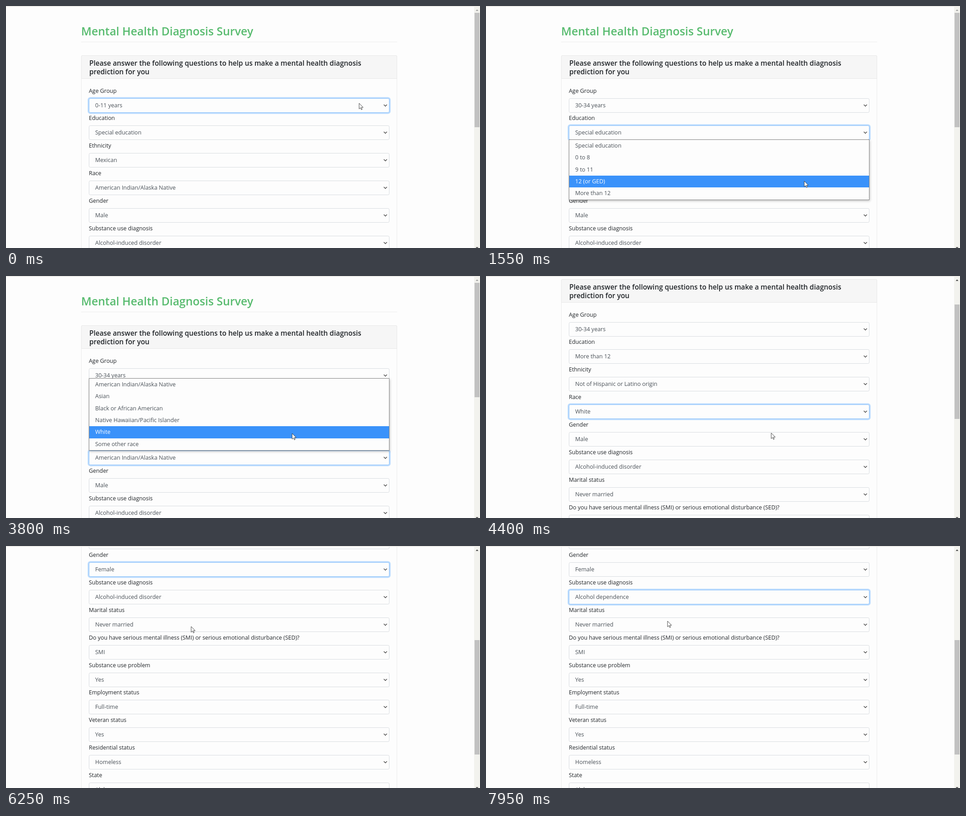
Recreate the animation shown at these times as an HTML page. Size 1047 by 535 pixels, loop 8000 ms.

```html
<!DOCTYPE html>
<html lang="en">
<head>
<meta charset="utf-8">
<title>Mental Health Diagnosis Survey</title>
<style>
  html, body { margin: 0; width: 100%; height: 100%; overflow: hidden; }
  body { position: relative; background: #fdfdfd; color: #212529; font: 12.4px/20px "Open Sans", "Noto Sans", sans-serif; }
  #stage { position: absolute; left: 0; top: 0; width: 1047px; height: 535px; overflow: hidden; background: #fdfdfd; }
  #stage div, #stage svg, h1, h2 { position: absolute; box-sizing: border-box; margin: 0; white-space: nowrap; }
  #page { left: 0; top: 0; width: 1034px; height: 1140px; }
  h1 { left: 166px; top: 38px; font-size: 24.9px; line-height: 35px; font-weight: 600; color: #58bb6f; }
  .rule { left: 166px; top: 79px; width: 698px; height: 1px; background: #ececec; }
  .card { left: 166px; top: 109px; width: 698px; height: 1020px; border: 1px solid #ebebeb; border-radius: 3px; }
  h2 { left: 166px; top: 109px; width: 698px; height: 52px; padding: 6.5px 16px 0 17px; font-size: 15.4px; line-height: 19.8px; font-weight: 600;
       background: #f6f6f6; border: 1px solid #e8e8e8; border-radius: 3px 3px 0 0; }
  .label { left: 183px; }
  .select { left: 183px; width: 664px; height: 32px; padding-left: 13px; line-height: 30.5px; font-size: 12.5px; color: #495057;
            background: #fdfdfd; border: 1px solid #d8dce0; border-radius: 3.3px; }
  .select.focus { border-color: #8cc1f9; box-shadow: 0 0 0 2.6px rgba(0, 123, 255, .26); }
  .select svg { right: 3px; top: 12px; }
  .popup { left: 183px; width: 664px; background: #fdfdfd; border: 1px solid #868686; box-shadow: 1px 2px 5px rgba(0, 0, 0, .25); z-index: 2; }
  .option { left: 0; width: 100%; height: 26.3px; padding-left: 13px; line-height: 26.3px; font-size: 12.5px; color: #495057; }
  .option.hot { background: #3a92fa; color: #fff; }
  .edge { left: 0; top: 0; width: 1047px; height: 2px; background: linear-gradient(#e4e3df 50%, #f3f2ef 50%); }
  .track { left: 1034px; top: 2px; width: 13px; height: 533px; background: #f2f2ee; }
  #thumb { left: 1035px; top: 15px; width: 11px; height: 253px; background: #c1c1c1; }
</style>
</head>
<body>
<div id="stage">
  <div id="page">
    <h1>Mental Health Diagnosis Survey</h1>
    <div class="rule"></div>
    <div class="card"></div>
    <h2>Please answer the following questions to help us make a mental health diagnosis<br>prediction for you</h2>
  </div>
  <div class="edge"></div>
  <div class="track"></div>
  <div id="thumb"></div>
  <svg width="13" height="535" style="left:1034px;top:0">
    <path id="up" d="M3.5 11h6l-3-3.5z"/>
    <path d="M3.5 533h6l-3 3.5z" fill="#505050"/>
  </svg>
  <svg id="cursor" width="14" height="20" style="left:-1px;top:-1px;z-index:3">
    <path d="M1 1v12.6l2.9-2.7 2 4.4 1.9-.9-2-4.2h4.1z" fill="#fff" stroke="#333" stroke-width=".9"/>
  </svg>
</div>
<script>
const LOOP = 8000, PITCH = 60.87, ROW = 26.3;
const $ = id => document.getElementById(id);
const page = $('page');

// options: first is the initial value; pick is chosen when the list closes
const fields = [
  { label: 'Age Group', pick: 6, open: 150, close: 900,
    options: ['0-11', '12-14', '15-17', '18-20', '21-24', '25-29', '30-34', '35-39', '40-44', '45-49', '50-54', '55-59', '60-64', '65+'].map(a => a + ' years') },
  { label: 'Education', pick: 4, open: 1250, close: 1750,
    options: ['Special education', '0 to 8', '9 to 11', '12 (or GED)', 'More than 12'] },
  { label: 'Ethnicity', pick: 3, open: 2200, close: 2850,
    options: ['Mexican', 'Puerto Rican', 'Other Hispanic or Latino origin', 'Not of Hispanic or Latino origin'] },
  { label: 'Race', pick: 4, open: 3300, close: 3950, upward: true,
    options: ['American Indian/Alaska Native', 'Asian', 'Black or African American', 'Native Hawaiian/Pacific Islander', 'White', 'Some other race'] },
  { label: 'Gender', pick: 1, open: 5500, close: 5950, options: ['Male', 'Female'] },
  { label: 'Substance use diagnosis', pick: 3, open: 6850, close: 7750,
    options: ['Alcohol-induced disorder', 'Substance-induced disorder', 'Alcohol intoxication', 'Alcohol dependence', 'Cocaine dependence',
      'Cannabis dependence', 'Opioid dependence', 'Other substance dependence', 'Alcohol abuse', 'Cocaine abuse', 'Cannabis abuse',
      'Opioid abuse', 'Other substance related conditions'] },
  { label: 'Marital status', options: ['Never married'] },
  { label: 'Do you have serious mental illness (SMI) or serious emotional disturbance (SED)?', options: ['SMI'] },
  { label: 'Substance use problem', options: ['Yes'] },
  { label: 'Employment status', options: ['Full-time'] },
  { label: 'Veteran status', options: ['Yes'] },
  { label: 'Residential status', options: ['Homeless'] },
  { label: 'State', options: ['Alabama'] }
];

// [time, scroll offset]: five wheel notches
const scrollKeys = [[0, 0], [4200, 0], [4350, 82], [4400, 102], [4480, 164], [4600, 164], [4730, 247],
  [4830, 247], [4960, 329], [6030, 329], [6180, 411]];

// [time, x, y] of the pointer tip
const pointerKeys = [[0, 780, 215], [150, 780, 215], [750, 745, 402], [900, 743, 404], [1150, 725, 283], [1250, 722, 280],
  [1550, 703, 387], [1680, 700, 412], [1760, 700, 412], [2100, 700, 345], [2200, 700, 343], [2700, 689, 448],
  [2950, 687, 450], [3200, 672, 405], [3300, 670, 402], [3750, 632, 348], [4400, 630, 347], [4750, 622, 338],
  [5250, 430, 113], [5450, 425, 134], [5500, 425, 134], [5850, 410, 186], [5950, 410, 186], [6250, 409, 178],
  [6700, 404, 115], [6850, 404, 112], [7450, 402, 218], [7750, 402, 219], [7950, 401, 166]];

function sample(keys, t) {
  const i = keys.findIndex(k => k[0] > t);
  if (i < 0) return keys[keys.length - 1].slice(1);
  const a = keys[i - 1], b = keys[i], u = (t - a[0]) / (b[0] - a[0]), e = u * u * (3 - 2 * u);
  return a.slice(1).map((v, n) => v + (b[n + 1] - v) * e);
}

function add(parent, className, top, text = '') {
  const el = document.createElement('div');
  el.className = className;
  el.style.top = top + 'px';
  el.textContent = text;
  parent.append(el);
  return el;
}

fields.forEach((f, i) => {
  const y = Math.round(203.6 + PITCH * i);
  add(page, 'label', y - 26.3, f.label);
  f.select = add(page, 'select', y);
  f.select.innerHTML = '<span></span><svg width="10" height="7"><path d="M1.5 1l3.5 3.5L8.5 1" fill="none" stroke="#444" stroke-width="1.3"/></svg>';
  f.value = f.select.firstChild;
  f.value.textContent = f.options[0];
  if (!f.open) return;
  const height = f.options.length * ROW + 2;
  f.top = f.upward ? y - height : y + 31;
  f.popup = add(page, 'popup', f.top);
  f.popup.style.height = height + 'px';
  f.rows = f.options.map((text, n) => add(f.popup, 'option', n * ROW, text));
});

const active = fields.filter(f => f.open);

function draw(t) {
  const scroll = Math.round(sample(scrollKeys, t)[0]);
  const [x, y] = sample(pointerKeys, t);
  page.style.transform = `translateY(${-scroll}px)`;
  $('thumb').style.transform = `translateY(${Math.round(scroll * .469)}px)`;
  $('up').setAttribute('fill', scroll ? '#505050' : '#a3a3a3');
  $('cursor').style.transform = `translate(${Math.round(x)}px, ${Math.round(y)}px)`;

  const focused = active.filter(f => f.open <= t).pop() || active[0];
  for (const f of active) {
    const shown = t >= f.open && t < f.close;
    f.select.classList.toggle('focus', f === focused);
    f.value.textContent = f.options[t >= f.close ? f.pick : 0];
    f.popup.style.display = shown ? 'block' : 'none';
    if (!shown) continue;
    const row = Math.floor((y + scroll - f.top - 1) / ROW);
    const hot = f.rows[row] ? row : 0;
    f.rows.forEach((r, n) => r.classList.toggle('hot', n === hot));
  }
}

function tick() {
  draw(performance.now() % LOOP);
  requestAnimationFrame(tick);
}
tick();
</script>
</body>
</html>
```
